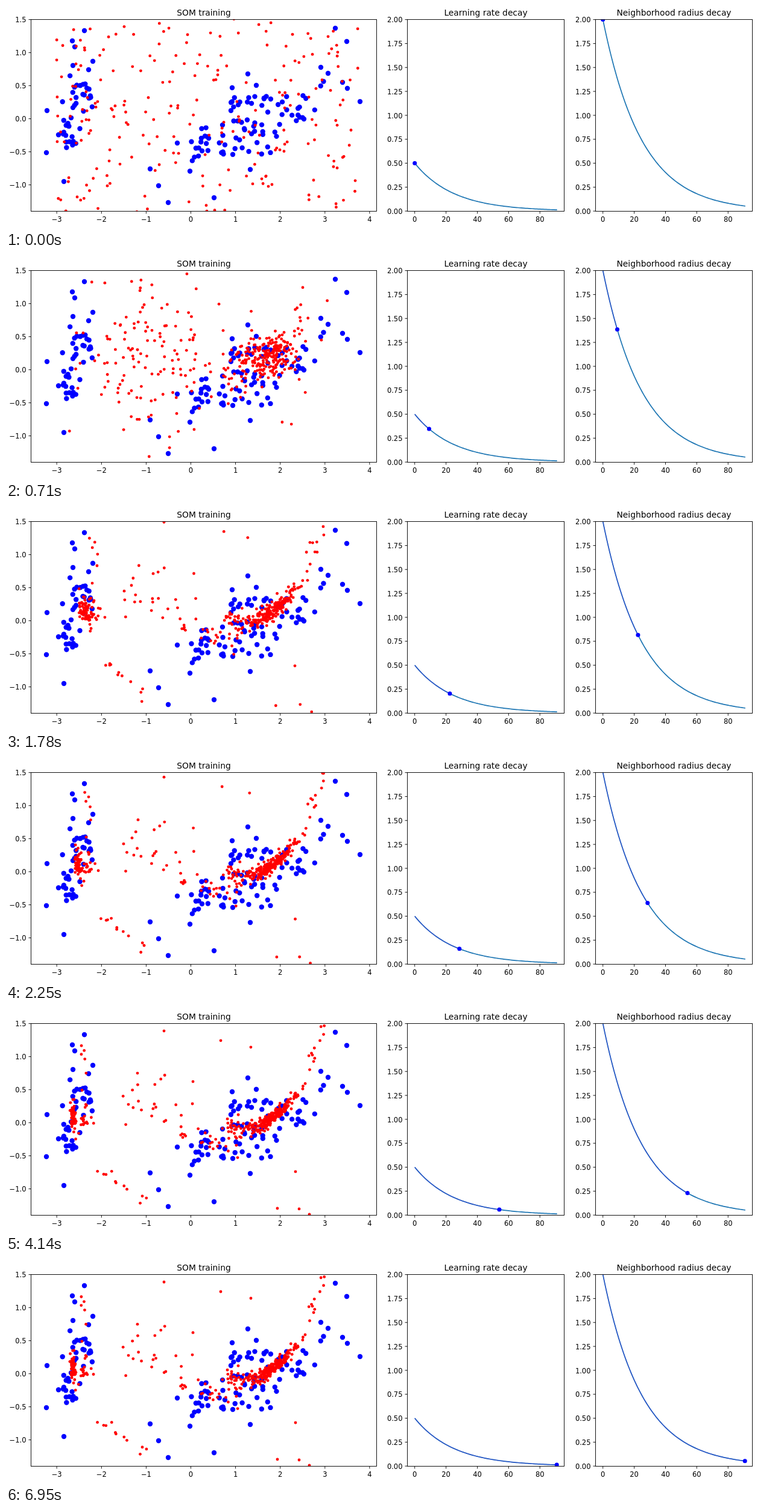
An HTML page with a canvas for the animation above (7010 ms loop, 1280 by 371 pixels).

```html
<!DOCTYPE html>
<html lang="en">
<head>
<meta charset="utf-8">
<title>SOM training</title>
<style>
html, body { margin: 0; width: 100%; height: 100%; overflow: hidden; background: #fff; }
canvas { display: block; }
</style>
</head>
<body>
<canvas id="stage" width="1280" height="371"></canvas>
<script>
const ctx = document.getElementById('stage').getContext('2d');
const LOOP = 7010, STEP = 77.9, TOP = 22.5, BOTTOM = 341.5;

let seed = 7;
function rand() {
  seed = (seed + 0x6D2B79F5) | 0;
  let v = Math.imul(seed ^ (seed >>> 15), 1 | seed);
  v = (v + Math.imul(v ^ (v >>> 7), 61 | v)) ^ v;
  return ((v ^ (v >>> 14)) >>> 0) / 4294967296;
}
const gauss = () => (rand() + rand() + rand() - 1.5) * 2;
const mix = (a, b, p) => a + (b - a) * p;

// A tilted random cloud of n points.
function cloud(n, x, y, spreadX, spreadY, slope = 0) {
  return Array.from({ length: n }, () => {
    const dx = spreadX * gauss();
    return [x + dx, y + slope * dx + spreadY * gauss()];
  });
}

const samples = [
  // outlying points
  [68, 174], [67, 244], [96, 292], [130, 41], [110, 58], [114, 68], [111, 99],
  [144, 92], [137, 106], [239, 271], [253, 299], [269, 327], [345, 319], [284, 228],
  [375, 136], [401, 113], [415, 132], [376, 247], [405, 272], [494, 188], [522, 102],
  [534, 112], [558, 127], [566, 137], [587, 159], [565, 59], [546, 37],
  ...cloud(18, 104, 207, 9, 12),
  ...cloud(21, 120, 145, 11, 17),
  ...cloud(20, 325, 236, 18, 17, -0.5),
  ...cloud(28, 398, 208, 24, 20),
  ...cloud(9, 385, 157, 16, 7),
  ...cloud(26, 466, 168, 27, 17, -0.25)
];

// Where the neurons settle.
const settled = [
  [262, 35], [356, 51], [406, 62], [450, 330], [486, 331], [503, 340], [480, 269],
  ...cloud(55, 111, 177, 2.5, 11),
  ...cloud(25, 127, 182, 9, 14),
  ...cloud(6, 130, 95, 4, 30),
  ...cloud(11, 190, 288, 28, 8, 0.7),
  ...cloud(24, 245, 168, 45, 28),
  ...cloud(20, 330, 220, 35, 12, 0.2),
  ...cloud(40, 387, 199, 14, 9),
  ...cloud(30, 422, 191, 12, 5, -0.3),
  ...cloud(140, 444, 177, 13, 5, -0.75),
  ...cloud(25, 474, 150, 10, 5, -1.1),
  ...cloud(12, 510, 75, 9, 12, -3)
];

// Random start, contraction towards the middle, then drift to the final place.
const neurons = settled.map(([x, y]) => {
  const noise = 14 + 0.12 * Math.max(0, 400 - x);
  return [
    [84 + 502 * rand() ** 1.2, mix(-110, 480, rand())],
    [x + 0.5 * Math.max(0, 320 - x) - 0.2 * Math.max(0, x - 440) + noise * gauss(),
      mix(y, 148, 0.4) + 1.4 * noise * gauss()],
    [x + 0.22 * Math.max(0, 200 - x) + 4 * gauss(), y - 8 + 4 * gauss()],
    [x, y]
  ];
});

function neuronAt(keys, step) {
  let i, p;
  if (step < 9) { i = 0; p = (step / 9) ** 0.7; }
  else if (step < 22) { i = 1; p = ((step - 9) / 13) ** 0.7; }
  else { i = 2; p = 1 - Math.exp((22 - step) / 7); }
  return [0, 1].map(c => mix(keys[i][c], keys[i + 1][c], p));
}

function dot(x, y, r) {
  ctx.beginPath();
  ctx.arc(x, y, r, 0, 7);
  ctx.fill();
}

function label(text, x, y, align, size = 11.5) {
  ctx.font = size + 'px "DejaVu Sans", sans-serif';
  ctx.textAlign = align;
  ctx.fillText(text, x, y);
}

function panel(title, left, right, xTicks, yTicks, drawInside) {
  ctx.save();
  ctx.beginPath();
  ctx.rect(left, TOP, right - left, BOTTOM - TOP);
  ctx.clip();
  drawInside();
  ctx.restore();

  ctx.strokeStyle = ctx.fillStyle = '#000';
  ctx.lineWidth = 0.92;
  ctx.strokeRect(left, TOP, right - left, BOTTOM - TOP);
  ctx.beginPath();
  for (const [x, text] of xTicks) {
    ctx.moveTo(x, BOTTOM);
    ctx.lineTo(x, BOTTOM + 4);
    label(text, x, 359, 'center');
  }
  for (const [y, text] of yTicks) {
    ctx.moveTo(left, y);
    ctx.lineTo(left - 4, y);
    label(text, left - 8, y + 4.6, 'right');
  }
  ctx.stroke();
  label(title, (left + right) / 2, 15.7, 'center', 13.8);
}

function ticks(from, to, gap, digits, place) {
  const out = [];
  for (let v = from; v <= to; v += gap)
    out.push([place(v), v.toFixed(digits).replace('-', '\u2212')]);
  return out;
}

function decayPanel(title, left, start, iteration) {
  const px = n => left + 12.2 + 2.594 * n;
  const py = v => 341.2 - 159.3 * v;
  const value = n => start * Math.exp(-n / 25);
  const curve = (end, color, width) => {
    ctx.beginPath();
    for (let n = 0; n < end; n++) ctx.lineTo(px(n), py(value(n)));
    ctx.lineTo(px(end), py(value(end)));
    ctx.strokeStyle = color;
    ctx.lineWidth = width;
    ctx.stroke();
  };
  panel(title, left, left + 260, ticks(0, 80, 20, 0, px), ticks(0, 2, 0.25, 2, py), () => {
    curve(91, '#1f77b4', 1.72);
    curve(iteration, 'rgba(50,30,225,.4)', 1.5);
    ctx.fillStyle = '#00f';
    dot(px(iteration), py(value(iteration)), 3.5);
  });
}

function draw(time) {
  const step = Math.max(0, Math.floor((time % LOOP - 5) / STEP));
  const iteration = step * 1.02;
  ctx.fillStyle = '#fff';
  ctx.fillRect(0, 0, 1280, 371);
  panel('SOM training', 41.5, 614.5,
    ticks(-3, 4, 1, 0, v => 306.5 + 74.1 * v),
    ticks(-1, 1.5, 0.5, 1, v => 187.6 - 110 * v), () => {
      ctx.fillStyle = '#00f';
      for (const [x, y] of samples) dot(x, y, 4.2);
      ctx.fillStyle = '#f00';
      for (const keys of neurons) dot(...neuronAt(keys, step), 2.4);
    });
  decayPanel('Learning rate decay', 665.5, 0.5, iteration);
  decayPanel('Neighborhood radius decay', 977.5, 2, iteration);
}

const begin = performance.now();
function tick() {
  draw(performance.now() - begin);
  requestAnimationFrame(tick);
}
tick();
</script>
</body>
</html>
```
